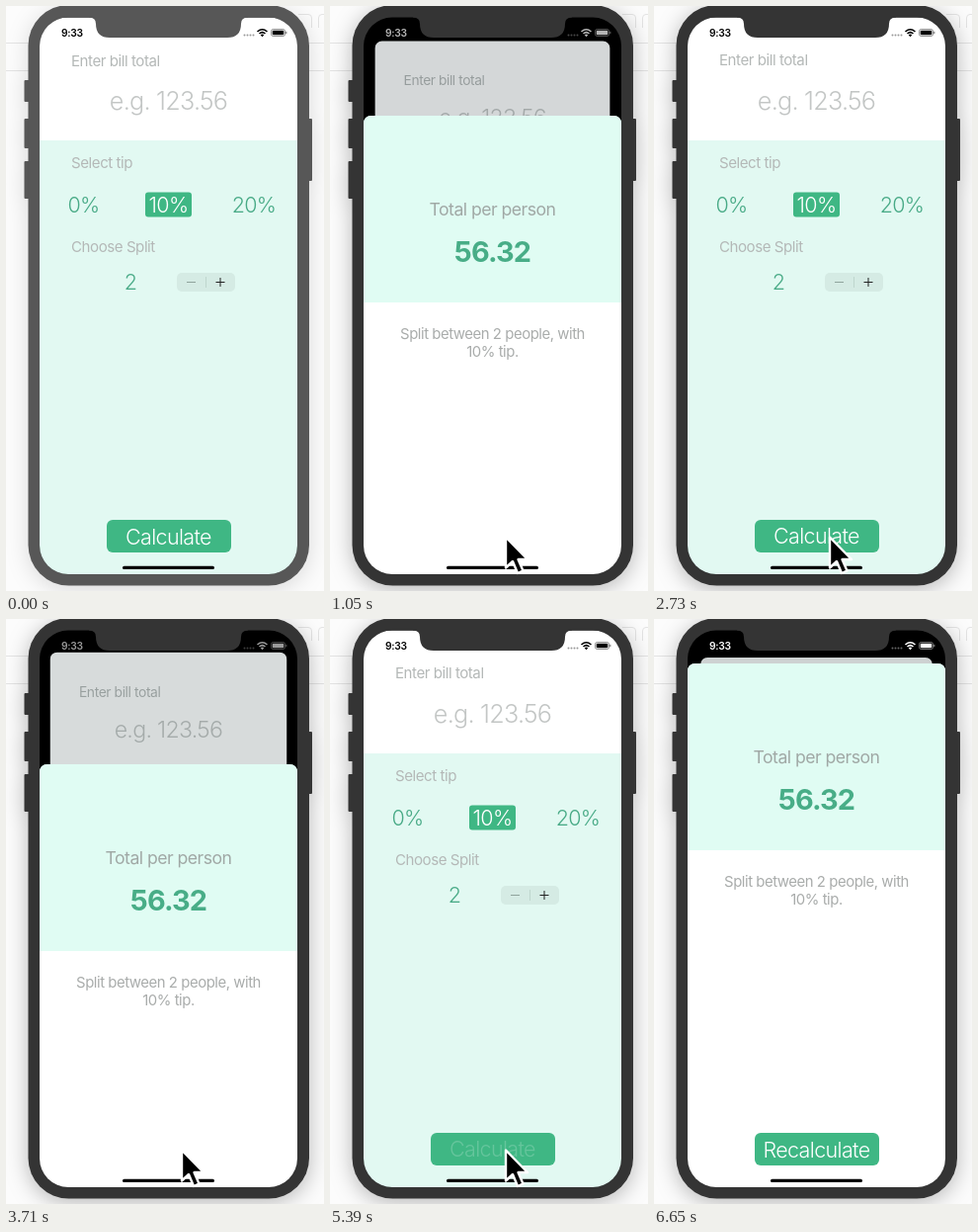
Animation, 322 px wide and 592 px high, one loop 6.72 s. Source, as an HTML page:

```html
<!DOCTYPE html>
<html lang="en">
<head>
<meta charset="utf-8">
<title>Bill splitter</title>
<style>
  html, body { margin: 0; width: 100%; height: 100%; overflow: hidden; background: #fcfcfc; }
  svg { display: block; width: 100vw; height: 100vh; }
  text { font: 400 15.1px Inter, "Open Sans", sans-serif; letter-spacing: -.03em; fill: #b4b8b7; }
  .mid { text-anchor: middle; }
  .big { font-size: 21.5px; font-weight: 350; fill: #48aa86; }
  .on { fill: #fff; }
  .note { font-size: 14.9px; fill: #a9acab; }
  .green { fill: #3fb784; }
  .mint { fill: #e2f9f2; }
  #sheet .mint { fill: #e0fcf3; }
  #phone { --body: #343434; --shade: .28; }
  #phone.idle { --body: #575757; --shade: .14; }
  .body { fill: var(--body); }
  .shadow { filter: drop-shadow(0 4px 11px rgb(0 0 0 / var(--shade))); }
</style>
</head>
<body>
<svg viewBox="0 0 322 592">
  <defs>
    <clipPath id="screen"><rect x="34" y="11.5" width="261" height="563.5" rx="29"/></clipPath>
    <clipPath id="card"><rect x="34" y="11.5" width="261" height="563.5" rx="8"/></clipPath>
  </defs>

  <!-- window behind the phone -->
  <path d="M0 37.5H322M0 65.5H322" stroke="#e4e4e4"/>
  <path d="M296 8.5H306Q309.5 8.5 309.5 12V22M322 8.5H320Q316.5 8.5 316.5 12V22" fill="none" stroke="#e4e4e4"/>

  <g id="phone">
    <g class="body shadow">
      <rect x="18.5" y="75" width="6" height="22" rx="1"/>
      <rect x="18.5" y="114" width="6" height="30" rx="1"/>
      <rect x="18.5" y="157" width="6" height="38" rx="1"/>
      <rect x="304" y="114" width="6" height="63" rx="1"/>
      <rect x="22.5" y="-1" width="284.5" height="587.5" rx="41"/>
    </g>

    <g clip-path="url(#screen)">
      <rect x="34" y="11" width="261" height="565"/>

      <g id="main"><g clip-path="url(#card)">
        <rect x="34" y="11" width="261" height="125" fill="#fff"/>
        <rect class="mint" x="34" y="136" width="261" height="440"/>
        <text x="66" y="60.5">Enter bill total</text>
        <text class="mid" x="164.5" y="105" style="font-size:25.2px;font-weight:350;fill:#c3c6c5">e.g. 123.56</text>
        <text x="66" y="164">Select tip</text>
        <rect id="chip" x="141" y="188.5" width="47" height="25" rx="3"/>
        <text class="mid big" x="78.5" y="209">0%</text>
        <text class="mid big on" x="164.5" y="209">10%</text>
        <text class="mid big" x="251" y="209">20%</text>
        <text x="66" y="249">Choose Split</text>
        <text class="mid big" x="126" y="287">2</text>
        <rect x="173" y="270" width="59" height="19" rx="5" fill="#d5ebe4"/>
        <path d="M202.5 274V285" stroke="#bfd6ce"/>
        <path d="M183 279.5H192" stroke="#8fa39c"/>
        <path d="M212.5 279.5H221.5M217 275V284" stroke="#222"/>
        <rect class="green" x="102" y="520" width="126" height="33" rx="6"/>
        <text id="calc" class="mid big on" x="164.5" y="544.5">Calculate</text>
        <rect id="dim" x="34" y="11" width="261" height="565" fill="#0c2022"/>
      </g></g>

      <g id="status">
        <text x="56" y="30.8" style="font-size:10.3px;font-weight:600;fill:inherit">9:33</text>
        <g opacity=".4">
          <circle cx="241.5" cy="29.5" r="1"/><circle cx="244.5" cy="29.5" r="1"/>
          <circle cx="247.5" cy="29.5" r="1"/><circle cx="250.5" cy="29.5" r="1"/>
        </g>
        <path class="line" d="M254.5 26Q259.5 21.5 264.5 26M256.5 28Q259.5 25.3 262.5 28" fill="none" stroke-width="1.5"/>
        <path d="M257.7 29.3Q259.5 27.9 261.3 29.3L259.5 31.2Z"/>
        <rect class="line" x="268.5" y="23.5" width="14" height="7" rx="2" fill="none" stroke-width=".7" opacity=".6"/>
        <rect x="269.7" y="24.7" width="11.6" height="4.6" rx="1"/>
        <rect x="283.3" y="25.8" width="1" height="2.4" opacity=".6"/>
      </g>

      <!-- sheet, drawn with its top edge at y = 0 -->
      <g id="sheet">
        <rect width="261" height="620" x="34" rx="8" fill="#fff"/>
        <path class="mint" d="M34 189V8Q34 0 42 0H287Q295 0 295 8V189Z"/>
        <text class="mid" x="164.5" y="101" style="font-size:17.65px;fill:#a0a8a5">Total per person</text>
        <text class="mid" x="164.5" y="148" style="font-size:28.9px;font-weight:700;fill:#48ad87">56.32</text>
        <text class="mid note" x="164.5" y="225.5">Split between 2 people, with</text>
        <text class="mid note" x="164.5" y="244">10% tip.</text>
        <rect class="green" x="102" y="475" width="126" height="33" rx="6"/>
        <text id="recalc" class="mid big on" x="164.5" y="499.5">Recalculate</text>
      </g>

      <rect x="118" y="566.8" width="93" height="3.2" rx="1.6"/>
    </g>

    <path class="body" d="M84 10V11.5Q91 11.5 91 18Q91 32 105 32H224Q238 32 238 18Q238 11.5 245 11.5V10Z"/>
  </g>

  <path id="cursor" d="M0 0V31L7 24.5L12 36.5L17.5 34L12.5 22.5H22Z" stroke="#fff" stroke-width="2.4" stroke-linejoin="round"/>
</svg>

<script>
const LOOP = 6720;
const MOVES = [802, 1770, 3501, 4442.5, 5540]; // sheet opens, closes, opens, ...
const HOLD = 165;                              // press time before each move
const $ = id => document.getElementById(id);
const clamp = v => Math.max(0, Math.min(1, v));
const mix = (a, b, k) => a + (b - a) * k;
const put = (id, attrs) => {
  for (const name in attrs) $(id).setAttribute(name, attrs[name]);
};

// critically damped spring, 0 to 1
function spring(ms) {
  const x = ms * .0145;
  return 1 - (1 + x) * Math.exp(-x);
}

// label fades while pressed; parity 0 opens, 1 closes
function labelAlpha(t, parity) {
  let alpha = 1;
  MOVES.forEach((at, i) => {
    if (i % 2 === parity && t >= at - HOLD) alpha = mix(.2, 1, clamp((t - at) / 250));
  });
  return alpha;
}

function cursorAt(t) {
  const enter = (1 - clamp((t - 70) / 530)) ** 2;
  const leave = clamp((t - 5880) / 420) ** 2;
  return [178 + 40 * enter + 30 * leave, 537.5 + 64 * (enter + leave)];
}

function draw(t) {
  const last = MOVES.findLastIndex(at => t >= at);
  const open = last >= 0 && last % 2 === 0;
  const since = last < 0 ? LOOP : t - MOVES[last];
  const p = open ? spring(since) : 1 - spring(since);
  const fade = clamp(since / 350);
  const grey = Math.round(255 * (open ? fade : 1 - fade));
  const ink = `rgb(${grey},${grey},${grey})`;
  const chip = [[63, 165], [183, 175], [132, 175]].map(([a, b]) => Math.round(mix(a, b, p)));

  $('phone').classList.toggle('idle', t < 560);
  put('main', { transform: `translate(164.5 ${11.5 + 27.5 * p}) scale(${1 - .1 * p}) translate(-164.5 -11.5)` });
  put('dim', { opacity: .2 * p });
  put('chip', { fill: `rgb(${chip})` });
  put('status', { fill: ink });
  for (const line of document.querySelectorAll('.line')) line.setAttribute('stroke', ink);
  put('sheet', { transform: `translate(0 ${mix(575, 45, p)})` });
  put('calc', { opacity: labelAlpha(t, 0) });
  put('recalc', { opacity: labelAlpha(t, 1) });
  put('cursor', { transform: `translate(${cursorAt(t)})` });
}

const start = performance.now();
function tick() {
  draw((performance.now() - start) % LOOP);
  requestAnimationFrame(tick);
}
tick();
</script>
</body>
</html>
```
